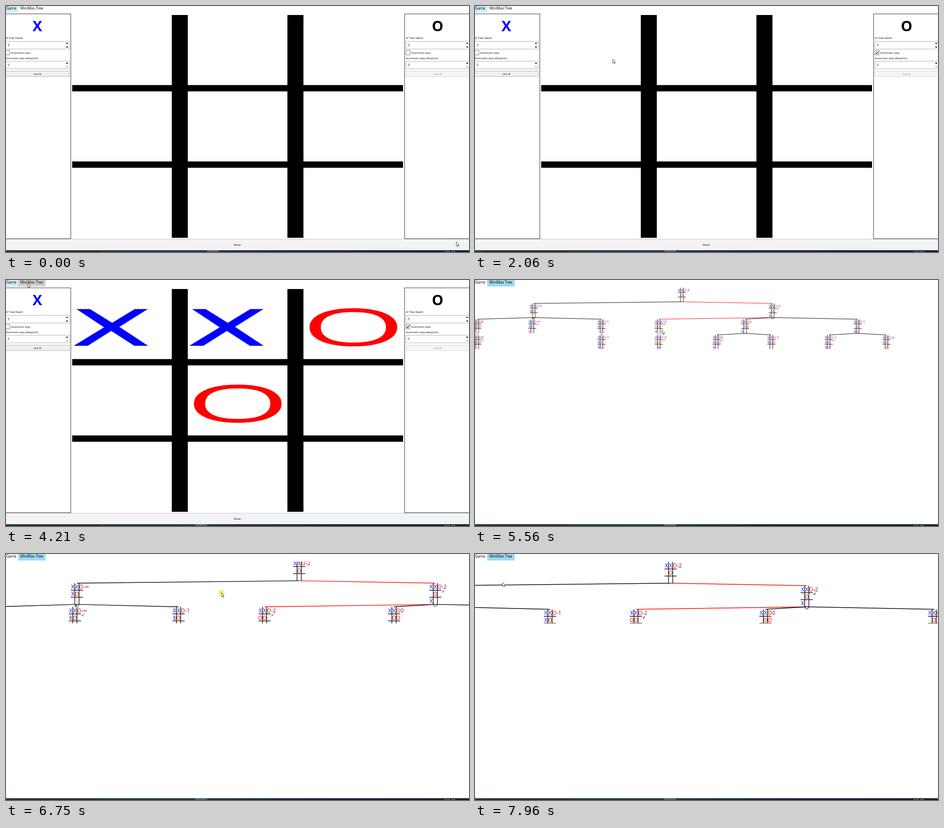
An HTML page with a canvas that plays this animation: 1025x546 px, repeating every 8 s.

```html
<!DOCTYPE html>
<html lang="en">
<head>
<meta charset="utf-8">
<title>Tic-tac-toe minimax</title>
<style>
html, body { margin: 0; width: 100%; height: 100%; overflow: hidden; background: #fff; }
canvas { display: block; }
</style>
</head>
<body>
<canvas id="stage" width="1025" height="546"></canvas>
<script>
const ctx = document.getElementById('stage').getContext('2d');
const LOOP = 8000, STEP = 80;
const BLUE = '#00f', RED = '#f00', PURPLE = '#800080';

// time, x, y
const cursorKeys = [
  [-10, 997, 524], [630, 888, 104], [1010, 888, 104], [1570, 560, 130], [1740, 560, 130],
  [2060, 305, 118], [2300, 305, 118], [2610, 515, 230], [3250, 466, 135], [3560, 466, 135],
  [3880, 160, 62], [3970, 160, 62], [4210, 48, 7], [5000, 48, 7], [5560, 414, 111],
  [6040, 414, 111], [6270, 308, 43], [6750, 477, 86], [6990, 379, 91], [7230, 182, 114],
  [7310, 182, 114], [7800, 65, 115], [7960, 61, 63]
];
// time, scale, pan x, pan y
const cameraKeys = [
  [0, 1, 0, 0], [5640, 1, 0, 0], [6040, 1.5, -207, -47.5], [6270, 1.5, -207, -47.5],
  [6750, 1.5, -38, -4.7], [6990, 1.5, -136.5, 0], [7310, 1.5, -136.5, 0], [7800, 1.5, -254, 0.7]
];
const presses = [[630, 1090], [2140, 2300], [3400, 3560], [4590, 4670], [6270, 6990], [7310, 7800]];
const moves = [[2220, 'X', 0, 0], [2300, 'O', 1, 1], [3480, 'X', 1, 0], [3560, 'O', 2, 0]];

// id, parent, centre x, level, board rows, score, ticked, on best path
const nodes = [
  ['r', '', 458, 0, 'XXO/ O /   ', '-2', 0, 1],
  ['a', 'r', 130, 1, 'XXO/XO /   ', '-∞', 0, 0],
  ['b', 'r', 659, 1, 'XXO/ O /X  ', '-2', 1, 1],
  ['a1', 'a', 5, 2, 'XXO/XOO/   ', '0', 0, 0],
  ['a2', 'a', 127, 2, 'XXO/XO /O  ', '-∞', 1, 0],
  ['a3', 'a', 280, 2, 'XXO/XO / O ', '-1', 0, 0],
  ['b1', 'b', 407, 2, 'XXO/OO /X  ', '-2', 1, 1],
  ['b2', 'b', 598, 2, 'XXO/ OO/X  ', '0', 0, 0],
  ['b3', 'b', 847, 2, 'XXO/ O /XO ', '-1', 0, 0],
  ['', 'a1', 5, 3, 'XXO/XOO/   ', '0', 1, 0],
  ['', 'a3', 280, 3, 'XXO/XO /XO ', '-1', 0, 0],
  ['', 'b1', 407, 3, 'XXO/OO / X ', '-2', 1, 1],
  ['', 'b2', 535, 3, 'XXO/XOO/X  ', '0', 1, 0],
  ['', 'b2', 656, 3, 'XXO/XOO/   ', '-1', 0, 0],
  ['', 'b3', 783, 3, 'XXO/XO /XO ', '-1', 1, 0],
  ['', 'b3', 911, 3, 'XXO/XO / O ', '-2', 0, 0]
].map(([id, parent, x, level, board, score, ticked, best]) =>
  ({ id, parent, x, y: level * 35, rows: board.split('/'), score, ticked, best }));

function track(keys, t) {
  const i = keys.findIndex(key => key[0] > t + 0.01);
  if (i < 0) return keys[keys.length - 1].slice(1);
  if (i === 0) return keys[0].slice(1);
  const from = keys[i - 1], to = keys[i];
  const elapsed = Math.floor((t - from[0] + 0.01) / STEP) * STEP;
  const p = elapsed / (to[0] - from[0]);
  return from.slice(1).map((v, k) => v + (to[k + 1] - v) * p);
}

function rect(x, y, w, h, fill, stroke) {
  if (fill) { ctx.fillStyle = fill; ctx.fillRect(x, y, w, h); }
  if (stroke) {
    ctx.strokeStyle = stroke;
    ctx.lineWidth = 1;
    ctx.strokeRect(x + 0.5, y + 0.5, w - 1, h - 1);
  }
}

function text(str, x, y, size, color = '#000', align = 'left', weight = 400) {
  ctx.font = `${weight} ${size}px "Open Sans", "Noto Sans", sans-serif`;
  ctx.textAlign = align;
  ctx.fillStyle = color;
  ctx.fillText(str, x, y);
}

function line(points, color, width) {
  ctx.beginPath();
  points.forEach(([x, y]) => ctx.lineTo(x, y));
  ctx.strokeStyle = color;
  ctx.lineWidth = width;
  ctx.stroke();
}

function polygon(points, fill) {
  ctx.beginPath();
  points.forEach(([x, y]) => ctx.lineTo(x, y));
  ctx.closePath();
  ctx.fillStyle = fill;
  ctx.fill();
}

function numberBox(x, y, value, downColor) {
  rect(x, y, 142, 18, '#fff', '#abadb3');
  text(value, x + 5, y + 11.3, 6.2);
  const ax = x + 136;
  polygon([[ax - 2.5, y + 6], [ax, y + 3], [ax + 2.5, y + 6]], '#000');
  polygon([[ax - 2.5, y + 12], [ax, y + 15], [ax + 2.5, y + 12]], downColor);
}

function playerPanel(x, name, color, checked, enabled) {
  rect(x - 3, 17, 148, 500, '#fff', '#333');
  text(name, x + 70.5, 56, 32, color, 'center', 700);
  text('AI Tree Depth', x, 73, 6.15);
  numberBox(x, 78, '3', '#000');
  rect(x, 98, 10, 11, '#fff', '#777');
  if (checked) line([[x + 2.5, 103.5], [x + 4.3, 106], [x + 8, 100.8]], '#1c2c3c', 1.4);
  text('Automatic play', x + 12, 106, 6.15);
  text('Automatic play delay(ms)', x, 118, 6.15);
  numberBox(x, 122, '0', '#999');
  rect(x, 144, 142, 13, enabled ? '#f0f0f0' : '#f5f5f5', enabled ? '#b0b0b0' : '#d4d4d4');
  text('Use AI', x + 70.5, 152.7, 6.15, enabled ? '#000' : '#8a8a8a', 'center');
}

function oval(cx, cy, rx, ry, power) {
  for (let i = 0; i < 96; i++) {
    const a = i / 48 * Math.PI, c = Math.cos(a), s = Math.sin(a);
    const x = cx + rx * Math.sign(c) * Math.abs(c) ** (2 / power);
    const y = cy + ry * Math.sign(s) * Math.abs(s) ** (2 / power);
    i ? ctx.lineTo(x, y) : ctx.moveTo(x, y);
  }
  ctx.closePath();
}

function drawMark(mark, col, row) {
  ctx.save();
  ctx.translate(col * 256, row * 169.5);
  if (mark === 'X') {
    polygon([[156, 64.5], [186, 64.5], [235, 95], [285, 64.5], [314, 64.5], [251, 104],
      [314.5, 146], [284, 146], [233, 113], [181, 146], [150, 146], [217, 105]], BLUE);
  } else {
    ctx.beginPath();
    oval(257, 105, 97, 42.3, 2.2);
    oval(257, 105, 72, 33.8, 2.35);
    ctx.fillStyle = RED;
    ctx.fill('evenodd');
  }
  ctx.restore();
}

function drawGame(t) {
  playerPanel(-1, 'X', BLUE, false, true);
  playerPanel(885, 'O', '#000', t >= 770, false);
  for (const x of [367, 623]) rect(x, 20, 35.5, 494.5, '#000');
  for (const y of [175.5, 345]) rect(146.5, y, 732.5, 14, '#000');
  for (const [start, mark, col, row] of moves) if (t >= start) drawMark(mark, col, row);
  rect(-1, 517, 1027, 26, '#f3f3f3', '#c8c8c8');
  text('Reset', 512.3, 532, 6.15, '#000', 'center');
}

function drawNode({ x, y, rows, score, ticked, id }, tickColor) {
  for (const dx of [-3.1, 3.1]) line([[x + dx, y], [x + dx, y + 31.4]], '#000', 0.9);
  for (const dy of [10.4, 20.8]) line([[x - 9, y + dy], [x + 9, y + dy]], '#000', 0.9);
  rows.forEach((cells, r) => [...cells].forEach((cell, c) => {
    if (cell !== ' ') {
      text(cell, x + (c - 1) * 6.2, y + 8.3 + r * 10.6, 8, cell === 'X' ? BLUE : RED, 'center');
    }
  }));
  text(score, x + 9.6, y + 8.3, 7.9, PURPLE);
  if (ticked) line([[x + 10.3, y + 12.3], [x + 11, y + 13.4], [x + 13, y + 10.6]], tickColor, 0.7);
  if (id === 'a' || id === 'b') {
    ctx.beginPath();
    ctx.ellipse(x, y + 31.4, 2.9, 2.9, 0, 0, Math.PI);
    ctx.strokeStyle = tickColor;
    ctx.lineWidth = 0.8;
    ctx.stroke();
  }
  if (id === 'a') line([[x - 2.3, y + 32], [x - 1.5, y + 33], [x + 0.2, y + 30.5]], tickColor, 0.7);
}

function drawTree(t) {
  const [scale, panX, panY] = track(cameraKeys, t);
  const tickColor = scale > 1 && t < 7800 ? '#0a5f14' : '#000';
  ctx.save();
  ctx.beginPath();
  ctx.rect(0, 17, 1025, 137);
  ctx.clip();
  ctx.translate(panX, 17 + panY);
  ctx.scale(scale, scale);
  for (const node of nodes) {
    const parent = nodes.find(other => other.id && other.id === node.parent);
    if (parent) line([[parent.x, parent.y + 31.4], [node.x, node.y]], node.best ? RED : '#000', 0.95);
  }
  nodes.forEach(node => drawNode(node, tickColor));
  ctx.restore();
}

function drawTabs(t, x, y) {
  const onTree = t >= 4590;
  const hovered = x > 27 && x < 88 && y < 15;
  if (!onTree) rect(0, 0, 27, 15, '#cdeef7');
  if (onTree) rect(27, 0, 61, 14.5, '#a1d9f0');
  else if (hovered) rect(27, 0, 61, 14.5, '#d0d0d0');
  text('Game', 0.5, 8.2, 8.05);
  text('MiniMax Tree', 31.8, 8.2, 8.05);
}

function drawTaskbar(t) {
  const shade = ctx.createLinearGradient(0, 0, 1025, 0);
  shade.addColorStop(0, '#203c42');
  shade.addColorStop(0.4, '#233c48');
  shade.addColorStop(0.65, '#18283a');
  shade.addColorStop(1, '#172233');
  rect(0, 542, 1025, 4, shade);
  rect(22, 542, 185, 4, '#303032');
  rect(t < 1330 ? 445 : 419, 542, 26, 4, '#53656e');
  text('6:01 AM', 971, 548.5, 6.2, '#fff');
}

function drawCursor(t, x, y) {
  if (presses.some(([from, to]) => t >= from && t < to)) {
    ctx.beginPath();
    ctx.arc(x, y, 6.5, 0, Math.PI * 2);
    ctx.fillStyle = 'rgba(247, 236, 70, 0.8)';
    ctx.fill();
  }
  const outline = [[0, 0], [0, 9], [2, 7.2], [3.5, 10.3], [4.9, 9.6], [3.5, 6.6], [6.2, 6.4]]
    .map(([dx, dy]) => [x + dx, y + dy]);
  polygon(outline, '#fff');
  ctx.strokeStyle = '#222';
  ctx.lineWidth = 0.8;
  ctx.stroke();
}

function frame(now) {
  const t = now % LOOP;
  const [x, y] = track(cursorKeys, t);
  rect(0, 0, 1025, 546, '#fff');
  if (t < 4590) drawGame(t);
  else drawTree(t);
  drawTabs(t, x, y);
  drawTaskbar(t);
  drawCursor(t, x, y);
  requestAnimationFrame(frame);
}
requestAnimationFrame(frame);
</script>
</body>
</html>
```
